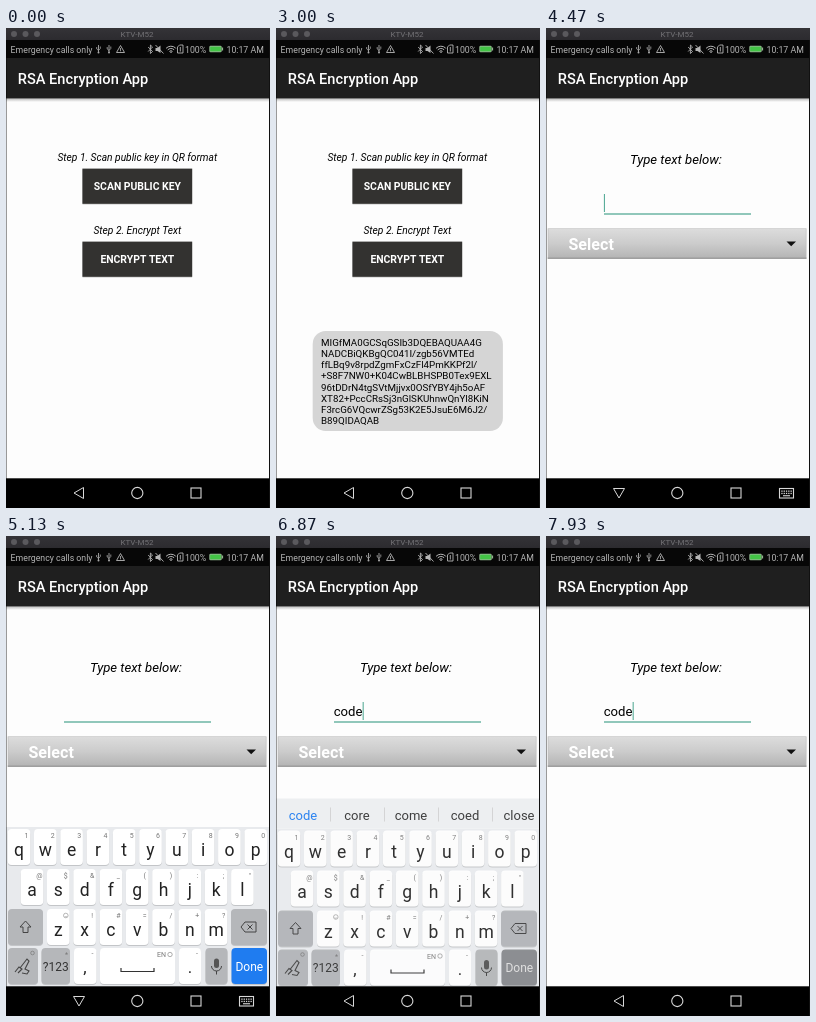
Animation, 264 px wide and 480 px high, one loop 8 s. Source, as an HTML page with a canvas:

```html
<!DOCTYPE html>
<html lang="en">
<head>
<meta charset="utf-8">
<title>Encryption app demo</title>
<style>
html, body { margin: 0; width: 100%; height: 100%; overflow: hidden; background: #000; }
canvas { display: block; width: 264px; height: 480px; }
</style>
</head>
<body>
<canvas id="stage"></canvas>
<script>
const W = 264, H = 480, LOOP = 8000, TICK = 1000 / 15;
const SP = 263 / 360; // pixels per Android text unit
const BAR_END = 70.4, NAV_TOP = 450.3;
const TEAL = '#4aa58f', BLUE = '#1f7cf0';
const canvas = document.getElementById('stage');
const ratio = window.devicePixelRatio || 1;
canvas.width = W * ratio;
canvas.height = H * ratio;
const ctx = canvas.getContext('2d');
ctx.scale(ratio, ratio);

const KEY_TEXT = [
  'MIGfMA0GCSqGSIb3DQEBAQUAA4G', 'NADCBiQKBgQC041I/zgb56VMTEd',
  'ffLBq9v8rpdZgmFxCzFl4PmKKPf2l/', '+S8F7NW0+K04CwBLBHSPB0Tex9EXL',
  '96tDDrN4tgSVtMjjvx0OSfYBY4jh5oAF', 'XT82+PccCRsSj3nGlSKUhnwQnYl8KiN',
  'F3rcG6VQcwrZSg53K2E5JsuE6M6J2/', 'B89QIDAQAB'
];
const SUGGESTIONS = [
  [],
  ['c', 'can', 'could', 'come', 'call'],
  ['co', 'come', 'could', 'cool', 'cold'],
  ['cod', 'cos', 'code', 'cool', 'cold'],
  ['code', 'core', 'come', 'coed', 'close']
];
const TYPED_AT = [83, 86, 89, 92];
const CARET_ON = [[50, 59], [67, 74], [82, 100], [103, 110], [118, 120]];

const clamp = v => Math.max(0, Math.min(1, v));
const within = (n, [from, to]) => n >= from && n < to;

function rect(x, y, w, h, color) {
  ctx.fillStyle = color;
  ctx.fillRect(x, y, w, h);
}

function roundRect(x, y, w, h, r, color) {
  ctx.beginPath();
  ctx.roundRect(x, y, w, h, r);
  ctx.fillStyle = color;
  ctx.fill();
}

function text(str, x, y, size, color, style = '', align = 'left') {
  ctx.font = `${style} ${size}px Roboto, sans-serif`;
  ctx.textAlign = align;
  ctx.fillStyle = color;
  ctx.fillText(str, x, y);
}

function line(points, color, width = 1, close = false) {
  ctx.beginPath();
  points.forEach(([x, y]) => ctx.lineTo(x, y));
  if (close) ctx.closePath();
  ctx.strokeStyle = color;
  ctx.lineWidth = width;
  ctx.stroke();
}

function polygon(points, color) {
  ctx.beginPath();
  points.forEach(([x, y]) => ctx.lineTo(x, y));
  ctx.fillStyle = color;
  ctx.fill();
}

function arc(x, y, r, from, to, color, width = 1) {
  ctx.beginPath();
  ctx.arc(x, y, r, from, to);
  ctx.strokeStyle = color;
  ctx.lineWidth = width;
  ctx.stroke();
}

function gradient(y0, y1, ...stops) {
  const g = ctx.createLinearGradient(0, y0, 0, y1);
  stops.forEach((c, i) => g.addColorStop(i / (stops.length - 1), c));
  return g;
}

function layer(x, y, alpha, draw) {
  ctx.save();
  ctx.translate(x, y);
  ctx.globalAlpha = alpha;
  draw();
  ctx.restore();
}

function page() {
  rect(0, 30, W, 422, '#fdfdfd');
  rect(0, 70, W, 4, gradient(70, 74, '#b4b4b4', '#fdfdfd'));
  rect(0, 30, W, BAR_END - 30, '#1f1f1f');
  text('RSA Encryption App', 11.8, 56, 20 * SP, '#fff', '500');
}

function button(label, y) {
  rect(76.5, y + 1, 109.6, 35, '#cfcfcf');
  rect(76.4, y, 109.8, 35.2, '#333230');
  text(label, 131.3, y + 21.4, 10.4, '#fff', 'bold', 'center');
}

function homePage() {
  page();
  text('Step 1. Scan public key in QR format', 131.3, 133, 14 * SP, '#000', 'italic', 'center');
  button('SCAN PUBLIC KEY', 140.6);
  text('Step 2. Encrypt Text', 131.3, 206, 14 * SP, '#000', 'italic', 'center');
  button('ENCRYPT TEXT', 213.6);
}

function inputPage(typed, caret) {
  page();
  text('Type text below:', 130, 136, 18 * SP, '#000', 'italic', 'center');
  text(typed, 57.7, 180, 18 * SP, '#000');
  if (caret) {
    const x = 57.9 + (typed ? ctx.measureText(typed).width : 0);
    rect(x, 166, 1, 18, TEAL);
  }
  rect(58, 185.4, 147, 1.2, TEAL);
  rect(1.7, 200.4, 258.8, 30, '#bcbcbc');
  rect(2.4, 201, 257.4, 28.6, gradient(201, 229.6, '#dcdcdc', '#cccccc', '#b5b5b5'));
  rect(1.7, 229.6, 258.8, 1.2, '#8f8f8f');
  text('Select', 22.5, 221.5, 22 * SP, '#fff', 'bold');
  polygon([[240.5, 213.5], [250, 213.5], [245.2, 218.3]], '#111');
}

function toast(n) {
  if (n < 23 || n >= 56) return;
  const out = clamp((n - 50) / 6);
  layer(0, 5 * out * out, 1 - 0.8 * out, () => {
    roundRect(36.7, 303, 190.2, 100, 13, '#d5d5d5');
    KEY_TEXT.forEach((s, i) => text(s, 45, 317.5 + 11.25 * i, 9.75, '#000'));
  });
}

function keyCap(x, y, w, color = '#fff') {
  roundRect(x, y + 1, w, 36, 4, '#c3c5c8');
  roundRect(x, y, w, 36, 4, color);
}

function keyRow(letters, hints, firstX, y) {
  [...letters].forEach((c, i) => {
    const x = firstX + i * 26.3;
    keyCap(x - 11.3, y, 22.6);
    text(c, x, y + 27, 17.5, '#222', '', 'center');
    text([...hints][i], x + 7.5, y + 9, 7, '#777', '', 'center');
  });
}

function keyboard(words, donePressed) {
  const gray = '#b5b7ba', ink = '#444';
  rect(0, 291, W, 190, '#e8eaed');
  if (words.length) {
    rect(0, 261, W, 30, '#eceef0');
    words.forEach((w, i) => {
      text(w, 27 + i * 54, 282.5, 13, i ? '#333' : BLUE, '', 'center');
      if (i) rect(i * 54, 270, 0.8, 14, '#ccc');
    });
  }
  keyRow('qwertyuiop', '1234567890', 13, 293);
  keyRow('asdfghjkl', '@$&_():;"', 26, 333);
  keyRow('zxcvbnm', ' !#=/+?', 52.3, 373);
  arc(59.8, 379.5, 2.3, 0, 7, '#888', 0.6);
  arc(59.8, 379.7, 1.1, 0.2, 2.9, '#888', 0.5);

  keyCap(2, 373, 35, gray);
  line([[19.5, 385], [25, 391], [22, 391], [22, 396.5], [17, 396.5], [17, 391], [14, 391]], ink, 1, true);
  keyCap(225, 373, 36, gray);
  line([[235, 391], [239, 386], [250, 386], [250, 396], [239, 396]], ink, 1, true);
  line([[241.5, 388.5], [246.5, 393.5]], ink);
  line([[246.5, 388.5], [241.5, 393.5]], ink);

  keyCap(2, 412, 30, gray);
  line([[9, 436], [13, 431], [16, 433], [12, 437]], ink, 1.1);
  line([[14, 432], [21, 423], [23, 425], [19, 433], [23, 435], [21, 438], [16, 437]], ink, 1.1);
  arc(26.5, 417, 1.8, 0, 7, '#777', 0.7);
  keyCap(35.5, 412, 28.5, gray);
  text('?123', 49.8, 434.5, 12, '#333', '', 'center');
  text('*', 60.5, 421, 7, '#777', '', 'center');
  keyCap(68, 412, 22.5);
  text(',', 79, 437, 17, '#222', '', 'center');
  text('-', 86.5, 420, 7, '#777', '', 'center');
  keyCap(94, 412, 75);
  text('EN', 151, 421, 7, '#777');
  arc(164, 418.5, 2.2, 0, 7, '#777', 0.6);
  line([[115, 432], [115, 435.5], [148, 435.5], [148, 432]], '#333', 1.2);
  keyCap(173, 412, 22);
  text('.', 184, 437, 17, '#222', '', 'center');
  text('-', 191, 420, 7, '#777', '', 'center');
  keyCap(199.5, 412, 22, gray);
  roundRect(208, 422.5, 5, 9.5, 2.5, '#555');
  arc(210.5, 430, 5, 0, Math.PI, ink);
  line([[210.5, 435], [210.5, 438.5]], ink);
  keyCap(225.5, 412, 35.5, donePressed ? '#898b8e' : BLUE);
  text('Done', 243.3, 434.5, 12, donePressed ? '#e4e4e4' : '#fff', '', 'center');
}

function usbIcon(x) {
  line([[x, 17], [x, 24.5]], '#aaa', 0.9);
  line([[x - 1.8, 19], [x - 1.8, 21], [x, 22.5], [x + 1.8, 20.5], [x + 1.8, 18.5]], '#aaa', 0.8);
  roundRect(x - 1, 23.5, 2, 2, 1, '#aaa');
}

function statusBar() {
  const ink = '#b5b5b5', size = 12 * SP;
  rect(0, 12, W, 18, '#070707');
  text('Emergency calls only', 4.6, 25, size, ink);
  usbIcon(92.5);
  usbIcon(103);
  line([[114.5, 17.5], [118.5, 24.5], [110.5, 24.5]], ink, 0.9, true);
  line([[114.5, 20], [114.5, 23.3]], ink, 0.8);

  line([[142.2, 19], [146.5, 23.5], [144.4, 25.5], [144.4, 17], [146.5, 19], [142.2, 23.5]], ink, 0.9);
  polygon([[149.5, 20], [151.5, 20], [154.5, 17.5], [154.5, 25], [151.5, 23], [149.5, 23]], ink);
  line([[149.5, 17], [157.5, 25.5]], ink, 0.9);
  [2.2, 4.5, 6.8].forEach(r => arc(165, 25, r, -Math.PI * 0.76, -Math.PI * 0.24, ink, 1));
  roundRect(164.2, 23.5, 1.6, 1.6, 0.8, ink);
  line([[173.5, 17], [177, 17], [177, 25], [171.5, 25], [171.5, 19]], ink, 0.9, true);
  line([[174.3, 19], [174.3, 23.5]], ink, 0.9);
  text('100%', 179, 24.5, size, ink);
  roundRect(203.3, 17.8, 12.4, 6.4, 1.2, '#93b890');
  rect(204.2, 18.7, 10.6, 4.6, '#43c446');
  rect(215.9, 19.5, 1.2, 3, '#93b890');
  text('10:17 AM', 220.5, 25, size, ink);
}

function navBar(keyboardOpen) {
  const ink = '#d8d8d8';
  rect(0, NAV_TOP, W, H - NAV_TOP, '#000');
  const back = keyboardOpen
    ? [[67.5, 460.5], [78.5, 460.5], [73, 470]]
    : [[77.5, 459.5], [77.5, 470.5], [68, 465]];
  line(back, ink, 1, true);
  arc(131.3, 465, 5.6, 0, 7, ink, 1.1);
  ctx.strokeRect(185, 460, 10, 10);
  if (!keyboardOpen) return;
  ctx.strokeRect(233.5, 460.5, 14, 9.5);
  for (let i = 0; i < 5; i++) {
    rect(235.3 + i * 2.3, 462.5, 1.3, 1.3, ink);
    rect(235.3 + i * 2.3, 464.8, 1.3, 1.3, ink);
  }
  rect(237, 467.2, 7, 1.1, ink);
}

function windowFrame() {
  rect(0, 12, 0.4, H - 12, '#000');
  rect(263, 12, 1, H - 12, '#111');
  rect(0, 0, W, 12, gradient(0, 12, '#343337', '#2c2b2f'));
  [8, 19.5, 31].forEach(x => roundRect(x - 3, 3, 6, 6, 3, '#5a595d'));
  text('KTV-M52', 131, 9, 8, '#737276', '', 'center');
}

function pages(n, typed) {
  const caret = CARET_ON.some(span => within(n, span));
  if (n < 50) return homePage();
  // Slide from 3300 ms, lasting 450 ms, with a cubic ease-out.
  const left = Math.pow(1 - clamp((n * TICK - 3300) / 450), 3);
  const shift = n >= 56 ? 0 : W * left;
  if (shift > 0) {
    layer(-0.41 * (W - shift), 0, 1, homePage);
    rect(0, 30, W, 422, `rgba(0,0,0,${0.43 * (1 - left)})`);
  }
  layer(shift, 0, 1, () => inputPage(typed, caret));
}

function keyboardLayer(n, count) {
  if (!within(n, [69, 106])) return;
  const enter = Math.pow(1 - clamp((n - 68) / 5), 3);
  const leave = Math.pow(clamp((n - 102) / 4), 2);
  layer(0, 24 * (enter + leave), 1 - enter - leave,
    () => keyboard(SUGGESTIONS[count], n >= 101));
}

function render(ms) {
  const n = Math.floor((ms % LOOP + 5) / TICK) % 120;
  const count = TYPED_AT.filter(at => n >= at).length;
  ctx.clearRect(0, 0, W, H);
  pages(n, 'code'.slice(0, count));
  keyboardLayer(n, count);
  toast(n);
  statusBar();
  navBar(within(n, [67, 103]));
  windowFrame();
}

let start;
function loop(now) {
  start ??= now;
  render(now - start);
  requestAnimationFrame(loop);
}
render(0);
requestAnimationFrame(loop);
</script>
</body>
</html>
```
